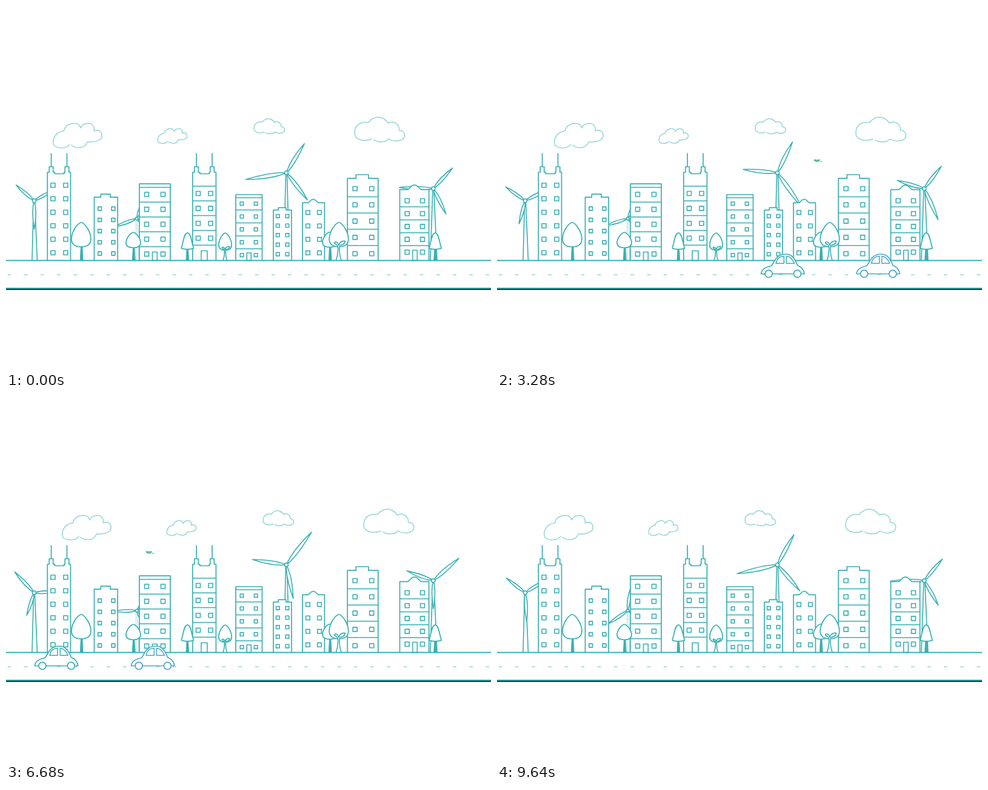
An HTML page with a canvas that plays this animation: 800 by 600 pixels, repeating every 9.68 s.

```html
<!DOCTYPE html>
<html lang="en">
<head>
<meta charset="utf-8">
<title>City skyline</title>
<style>
html, body { margin: 0; width: 100%; height: 100%; overflow: hidden; background: #fff; }
canvas { display: block; width: 800px; height: 600px; }
</style>
</head>
<body>
<canvas id="stage" width="800" height="600"></canvas>
<script>
const ctx = document.getElementById('stage').getContext('2d');
const LOOP = 9680, STEP = 40, GROUND = 419.5;
const TEAL = '#36b0b3', BLUE = '#4ba8cb', PALE = '#93d5d6', DARK = '#0c3a40';
const RAD = Math.PI / 180;

function paint(path, { stroke = TEAL, fill = '#fff', width = 1.7 } = {}) {
  if (fill) { ctx.fillStyle = fill; ctx.fill(path); }
  if (stroke) { ctx.strokeStyle = stroke; ctx.lineWidth = width; ctx.stroke(path); }
}

function line(x1, y1, x2, y2, color = TEAL, width = 1.7) {
  ctx.strokeStyle = color;
  ctx.lineWidth = width;
  ctx.beginPath();
  ctx.moveTo(x1, y1);
  ctx.lineTo(x2, y2);
  ctx.stroke();
}

function box(x, y, w, h) {
  ctx.strokeStyle = TEAL;
  ctx.lineWidth = 1.6;
  ctx.strokeRect(x, y, w, h);
}

function circle(x, y, r, stroke = TEAL, width = 1.6) {
  const p = new Path2D();
  p.arc(x, y, r, 0, Math.PI * 2);
  paint(p, { stroke, width });
}

function at(x, y, scale, draw) {
  ctx.save();
  ctx.translate(x, y);
  ctx.scale(scale, scale);
  draw();
  ctx.restore();
}

// Clouds
const puffy = new Path2D('M28 35C22 42 9 43 2 37C-2 30 2 15 18 13C20 3 30 -1 40 1Q44 3 46 8Q48 2 55 1C63 -1 69 3 68 13C75 10 81 13 81 21C81 29 69 32 57 31C53 41 40 44 30 36');
const wide = new Path2D('M28 36C20 40 4 40 0 30C-2 17 5 7 22 9C29 1 37 -1 43 1Q50 3 55 10C64 5 74 12 73 22C80 22 83 27 82 32C80 40 65 42 56 36C50 43 36 42 31 37');
const clouds = [[puffy, 77.3, 193, 1], [puffy, 250, 202, 0.6], [wide, 409.3, 185.7, 0.61], [wide, 575.5, 183, 1]];

function drawClouds(t) {
  const drift = 11 * (1 - Math.cos(2 * Math.PI * t / LOOP));
  for (const [shape, x, y, s] of clouds) {
    at(x + drift, y, s, () => paint(shape, { stroke: PALE, fill: null, width: 1.5 / s }));
  }
}

// Wind turbines: one long blade and two shorter ones
const SLOW = 720 / LOOP, FAST = 0.1106;
const turbines = [
  { x: 46.5, y: 321, long: 47, short: 39.4, phase: 90, speed: SLOW, feet: [43, 51.5] },
  { x: 215.5, y: 350.5, long: 39, short: 37.5, phase: 160, speed: FAST, feet: [214.5, 219], faint: true },
  { x: 462.5, y: 275, long: 68, short: 56.6, phase: 170.7, speed: SLOW, feet: [458, 467.5] },
  { x: 704.8, y: 301, long: 56, short: 46.5, phase: 182, speed: SLOW, feet: [700, 711] }
];

function blade(length, angle) {
  const w = 1.6 + length * 0.04;
  const p = new Path2D();
  p.moveTo(0, 0);
  p.bezierCurveTo(length * 0.25, -w, length * 0.6, -w, length, 0);
  p.bezierCurveTo(length * 0.6, w * 0.8, length * 0.25, w, 0, 0);
  ctx.save();
  ctx.rotate(angle * RAD);
  paint(p, { width: 1.6 });
  ctx.restore();
}

function drawTurbine(m, t) {
  const color = m.faint ? '#b5d9db' : TEAL, width = m.faint ? 1 : 1.6;
  line(m.x - 1, m.y + 3, m.feet[0], GROUND, color, width);
  line(m.x + 1, m.y + 3, m.feet[1], GROUND, color, width);
  const angle = m.phase + m.speed * t;
  at(m.x, m.y, 1, () => {
    blade(m.long, angle);
    blade(m.short, angle - 118.6);
    blade(m.short, angle + 131);
    circle(0, 0, m.long > 40 ? 3 : 2.3);
  });
}

// Buildings
const roofs = {
  flat: () => [],
  step: b => [[b.bump[0], b.top], [b.bump[0], b.bump[2]], [b.bump[1], b.bump[2]], [b.bump[1], b.top]],
  mast: b => [[3, 0], [3, -9], [9.5, -9], [9.5, 0], [12, 0], [12, 2.5], [27.5, 2.5], [27.5, 0], [29, 0],
    [29, -9], [35.5, -9], [35.5, 0]].map(([x, y]) => [b.left + x, b.top + y])
};

const buildings = [
  { left: 68.3, right: 106.5, top: 274, roof: 'mast', cols: [77.5, 98.5], size: 7, first: 295.5, pitch: 22.25, rows: 6 },
  { left: 145.5, right: 184.2, top: 315.2, roof: 'step', bump: [156.3, 172, 310.2], cols: [154.7, 177], size: 5.8, first: 334, pitch: 18.5, rows: 5 },
  { left: 220, right: 271, top: 293.2, cols: [232, 259], size: 7, first: 310.5, pitch: 24.6, rows: 5, floors: [299, 323.3, 347.8, 372.3, 396.8], door: [241.5, 249.3, 405.5] },
  { left: 307.8, right: 346.4, top: 274, roof: 'mast', cols: [317, 337.5], size: 7, first: 309, pitch: 24.6, rows: 4, floors: [297, 321.3, 345.6, 370, 394.3], door: [322, 332, 403.5] },
  { left: 379, right: 422.5, top: 311, cols: [389, 412.2], size: 5.6, first: 325.8, pitch: 21.2, rows: 5, floors: [316, 336.3, 357.6, 378.9, 400.2], door: [397.3, 404.3, 407] },
  { left: 441, right: 471, top: 336.3, roof: 'step', bump: [449.3, 462, 332.3], cols: [448.3, 464], size: 5.6, first: 346.3, pitch: 15.7, rows: 5 },
  { left: 489, right: 525.4, top: 324.3, roof: 'dome', bump: [498, 515.5, 318.5], cols: [498, 517], size: 6.6, first: 340.3, pitch: 22.2, rows: 4 },
  { left: 563.2, right: 613.8, top: 284.2, roof: 'step', bump: [577.3, 598, 278], cols: [575.7, 603.2], size: 7, first: 301, pitch: 26.8, rows: 5, floors: [314.5, 341.2, 368, 394.8] },
  { left: 649.5, right: 697.6, top: 302.7, roof: 'dome', bump: [662, 685.5, 295.2], cols: [661.7, 687], size: 7, first: 321, pitch: 21.2, rows: 5, floors: [331, 352.5, 373.8, 395], door: [670.7, 678.3, 402.5] }
];

function drawBuilding(b) {
  const p = new Path2D();
  p.moveTo(b.left, GROUND);
  p.lineTo(b.left, b.top);
  if (b.roof === 'dome') {
    const [x1, x2, peak] = b.bump, mid = (x1 + x2) / 2, w = x2 - x1;
    p.lineTo(x1, b.top);
    p.bezierCurveTo(x1 + w * 0.16, b.top, x1 + w * 0.22, peak, mid, peak);
    p.bezierCurveTo(x2 - w * 0.22, peak, x2 - w * 0.16, b.top, x2, b.top);
  } else {
    for (const [x, y] of roofs[b.roof || 'flat'](b)) p.lineTo(x, y);
  }
  p.lineTo(b.right, b.top);
  p.lineTo(b.right, GROUND);
  paint(p);
  if (b.roof === 'mast') {
    for (const dx of [6.3, 32.2]) line(b.left + dx, 242.5, b.left + dx, b.top - 9);
  }
  for (const y of b.floors || []) line(b.left, y, b.right, y, TEAL, 1.5);
  for (let i = 0; i < b.rows; i++) {
    for (const x of b.cols) box(x - b.size / 2, b.first + i * b.pitch - b.size / 2, b.size, b.size);
  }
  if (b.door) {
    const [x1, x2, y] = b.door;
    box(x1, y, x2 - x1, GROUND - y);
  }
}

// Trees
function crown(x, top, bottom, half) {
  const h = bottom - top, p = new Path2D();
  p.moveTo(x, top);
  p.bezierCurveTo(x + half * 0.55, top + h * 0.08, x + half, top + h * 0.45, x + half, top + h * 0.68);
  p.bezierCurveTo(x + half, top + h * 0.93, x + half * 0.5, bottom, x, bottom);
  p.bezierCurveTo(x - half * 0.5, bottom, x - half, top + h * 0.93, x - half, top + h * 0.68);
  p.bezierCurveTo(x - half, top + h * 0.45, x - half * 0.55, top + h * 0.08, x, top);
  paint(p);
}

function trunk(x, top) {
  const p = new Path2D();
  p.moveTo(x - 1.3, top);
  p.lineTo(x + 1.3, top);
  p.lineTo(x + 2.4, GROUND);
  p.lineTo(x - 2.4, GROUND);
  p.closePath();
  paint(p, { fill: TEAL, width: 0.8 });
}

function roundTree(x, top, bottom, half) {
  crown(x, top, bottom, half);
  trunk(x + 0.7, bottom);
}

function cone(x) {
  const p = new Path2D();
  p.moveTo(x - 10.3, 399.5);
  p.bezierCurveTo(x - 7, 391, x - 6, 374, x, 374);
  p.bezierCurveTo(x + 6, 374, x + 7, 391, x + 10.3, 399.5);
  p.quadraticCurveTo(x, 402.5, x - 10.3, 399.5);
  paint(p);
  trunk(x, 401);
}

const branches = new Path2D('M-4.7 0Q-1.2 -10 -1.3 -22Q-3 -27 -7.5 -28.5Q-6.5 -32 -3 -30Q-1 -28 -.2 -25Q2 -33 10.5 -32Q9.5 -26 2 -25Q.6 -22 1 -17Q1.5 -7 4.2 0');

function branchedTree(x, top, bottom, half, scale) {
  crown(x, top, bottom, half);
  at(x, GROUND, scale, () => paint(branches, { width: 1.6 / scale }));
}

function drawTrees() {
  roundTree(124, 356.5, 397, 16);
  roundTree(210, 373, 398.5, 12);
  cone(299.3);
  branchedTree(361.5, 374, 402.5, 10.7, 0.72);
  roundTree(534, 372.5, 397.5, 12);
  branchedTree(549, 356.5, 397, 15.8, 1);
  cone(708);
}

function drawRoad() {
  line(0, GROUND, 800, GROUND, TEAL, 1.8);
  for (let i = 0; i < 30; i++) {
    const x = 5.5 + i * 27.2;
    line(x - 2.8, 443, x + 2.8, 443, PALE, 1.5);
  }
  line(0, 465.1, 800, 465.1, TEAL, 1.8);
  line(0, 467, 800, 467, DARK, 2);
}

// Traffic
const body = new Path2D('M.5 33.5C1 27 6 22.5 17 20.5Q20 17 23.5 10.5C28 3 34 1 41 1C50 1 55 6 60.5 19.5C67 22 71 27 71.8 33.5Z');
const glass = new Path2D('M25 16.2C27 8 30 4.8 38.2 4.4L38.2 16.2ZM42.3 16.2L42.3 4.4C49 5 52.5 9 55.2 16.2Z');

function drawCar(x, color) {
  if (x > 802 || x < -75) return;
  at(x, 408, 1, () => {
    paint(body, { stroke: color });
    paint(glass, { stroke: color, width: 1.5 });
    circle(13, 33.3, 6, color, 1.7);
    circle(60.3, 33.3, 6, color, 1.7);
  });
}

// Bird
const flight = [[0, 819, 254], [2520, 597, 254], [4040, 461, 255], [5320, 358, 253], [6680, 237, 254], [8600, 61, 248], [LOOP, -36, 247]];

function drawBird(t) {
  const i = Math.max(1, flight.findIndex(k => k[0] > t));
  const [t0, x0, y0] = flight[i - 1], [t1, x1, y1] = flight[i];
  const k = (t - t0) / (t1 - t0);
  const wing = -2.8 - 0.8 * Math.sin(t / 60);
  const p = new Path2D();
  p.moveTo(-7, -1);
  p.lineTo(-4, -2);
  p.quadraticCurveTo(-1, 0, 0, wing);
  p.quadraticCurveTo(2, wing + 1, 4, wing);
  p.quadraticCurveTo(4, 1, 2, 2);
  p.quadraticCurveTo(-4, 4.5, -7, -1);
  at(x0 + (x1 - x0) * k, y0 + (y1 - y0) * k, 1, () => {
    paint(p, { stroke: null, fill: '#67b9a5' });
    ctx.fillRect(4.5, 1, 2, 2);
  });
}

function draw(now) {
  const t = Math.floor((now % LOOP) / STEP) * STEP;
  ctx.fillStyle = '#fff';
  ctx.fillRect(0, 0, 800, 600);
  ctx.lineJoin = 'round';
  drawClouds(t);
  for (const m of turbines) drawTurbine(m, t);
  buildings.forEach(drawBuilding);
  drawTrees();
  drawRoad();
  drawCar(809.7 - 0.11418 * t, TEAL);
  drawCar(965.3 - 0.11365 * t, BLUE);
  drawBird(t);
  requestAnimationFrame(draw);
}

requestAnimationFrame(draw);
</script>
</body>
</html>
```
